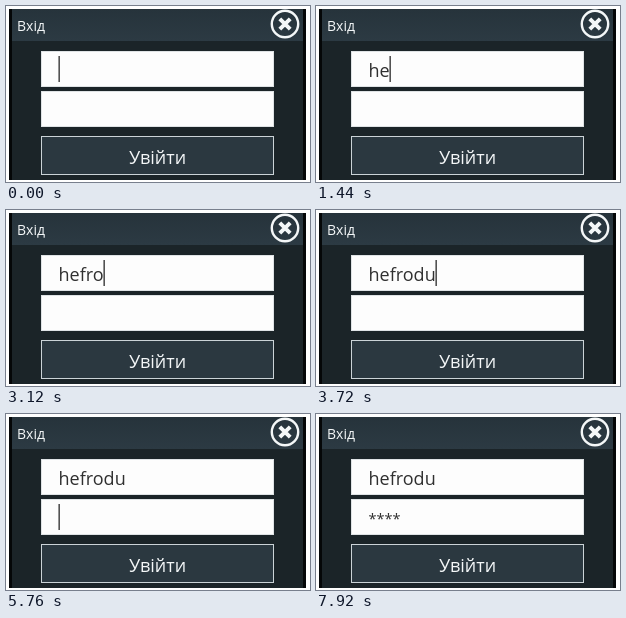
An HTML page for the animation above (8 s loop, 304 px wide and 176 px high).

```html
<!DOCTYPE html>
<html lang="uk">
<head>
<meta charset="utf-8">
<title>Вхід</title>
<style>
  html, body { margin: 0; width: 100%; height: 100%; overflow: hidden; background: #fff; }
  svg { display: block; width: 304px; height: 176px; }
  text { font-family: "Open Sans", "Noto Sans", sans-serif; white-space: pre; }
  .light { fill: #f4f7f8; }
  .entry { fill: #303030; }
</style>
</head>
<body>
<svg viewBox="0 0 304 176">
  <defs>
    <linearGradient id="bar" x1="0" y1="0" x2="0" y2="1">
      <stop offset="0" stop-color="#26333b"/>
      <stop offset="1" stop-color="#2c3a43"/>
    </linearGradient>
  </defs>
  <rect x="3" y="3" width="297" height="171" fill="#050708"/>
  <rect x="6" y="3" width="291" height="171" fill="#1b2428"/>
  <rect x="6" y="3" width="291" height="32" fill="url(#bar)"/>
  <text class="light" x="11" y="25" font-size="14">Вхід</text>

  <g fill="none" stroke="#f4f7f8">
    <circle cx="279" cy="18" r="13.2" stroke-width="2.4"/>
    <path d="M273.8 12.8l10.4 10.4m0-10.4l-10.4 10.4" stroke-width="4"/>
  </g>

  <g fill="#fdfdfd" stroke="#dfe3e5">
    <rect x="35.5" y="45.5" width="232" height="35"/>
    <rect x="35.5" y="85.5" width="232" height="35"/>
  </g>
  <rect x="35.5" y="130.5" width="232" height="38" fill="#2b3840" stroke="#cbd3d7"/>
  <text class="light" x="151.5" y="157.5" font-size="18" text-anchor="middle">Увійти</text>

  <text class="entry" id="login" x="52.5" y="71" font-size="18"></text>
  <text class="entry" id="secret" x="52.5" y="109.5" font-size="14.5"></text>
  <rect id="caret" width="1.3" height="26" fill="#2a2a2a"/>
</svg>
<script>
const LOOP = 8000;
const NAME = "hefrodu";
const $ = id => document.getElementById(id);
const login = $("login"), secret = $("secret"), caret = $("caret");

// Times of key presses, of the move to the second field and of caret blinks.
const nameKeys = [720, 1440, 1800, 2160, 3120, 3360, 3600];
const starKeys = [6120, 6720, 6960, 7200];
const FOCUS = 5400;
const blinks = [[120, 480], [1200, 1440], [2880, 3120], [4320, 4800],
                [5280, 5400], [5880, 6120], [6480, 6720], [7800, LOOP]];

const pressed = (keys, t) => keys.filter(k => t >= k).length;

function draw(t) {
  login.textContent = NAME.slice(0, pressed(nameKeys, t));
  secret.textContent = "*".repeat(pressed(starKeys, t));

  const second = t >= FOCUS;
  const field = second ? secret : login;
  const width = field.textContent ? field.getComputedTextLength() : 0;
  const hidden = blinks.some(([off, on]) => t >= off && t < on);
  caret.setAttribute("x", 52.5 + Math.round(width));
  caret.setAttribute("y", second ? 90 : 50);
  caret.setAttribute("visibility", hidden ? "hidden" : "visible");
}

const start = performance.now();
function tick() {
  draw((performance.now() - start) % LOOP);
  requestAnimationFrame(tick);
}
tick();
</script>
</body>
</html>
```
